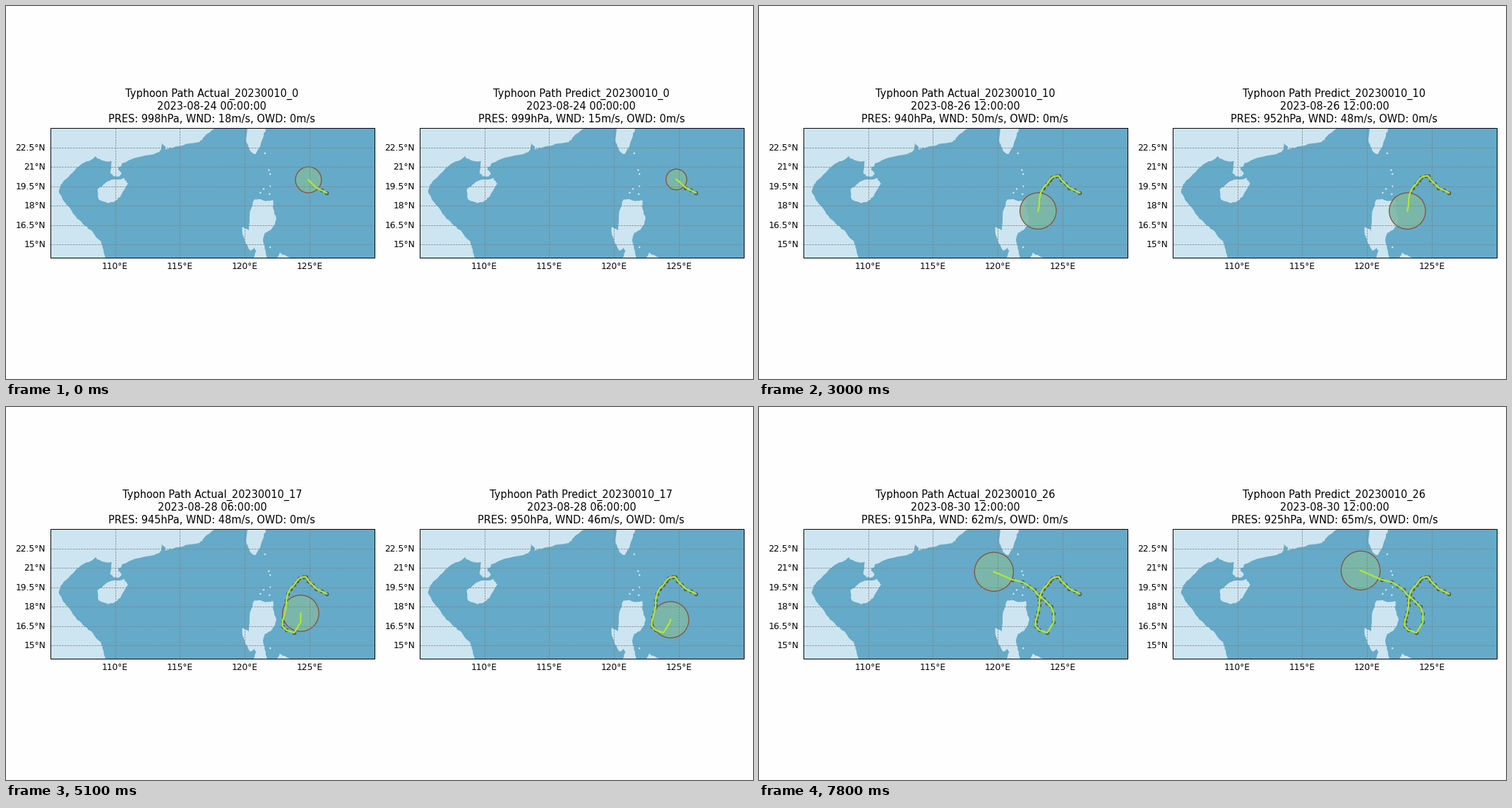
Animation of 1058 by 529 pixels, one loop 8 s. Source, as a matplotlib script:

```python
import numpy as np
import matplotlib.pyplot as plt
from matplotlib.animation import FuncAnimation
from matplotlib.patches import Circle, Polygon, Rectangle

W, H = 1058, 529
DEG = 18.38                      # pixels per degree
TOP, LEFTS = 173.05, (62.6, 585.6)
WEST, NORTH, WIDE, TALL = 105, 24, 25, 10
OCEAN, LAND = "#65aac8", "#cde5f0"
FRAME_MS, HOLD, FRAMES = 100, 3, 80

plt.rcParams["font.family"] = "DejaVu Sans"
fig = plt.figure(figsize=(12, 6), dpi=W / 12, facecolor="#fefefe")
ax = fig.add_axes([0, 0, 1, 1])
ax.set(xlim=(0, W), ylim=(H, 0))
ax.axis("off")

# Key points of the coasts in degrees; rough() adds the detail
MAINLAND = [
    (109.25, 14), (109.1, 14.6), (108.9, 15.25), (108.3, 16), (107.7, 16.5), (107.1, 17),
    (106.5, 17.8), (106, 18.4), (105.65, 19.1), (105.9, 19.8), (106.6, 20.4), (107, 20.9),
    (107.6, 21.3), (108.5, 21.75), (109.1, 21.45), (109.7, 21.45), (109.7, 20.5),
    (109.95, 20.25), (110.35, 20.3), (110.5, 20.55), (110.2, 20.9), (110.6, 21.25),
    (111.6, 21.75), (113, 22), (113.5, 22.2), (113.6, 22.85), (113.9, 22.4),
    (114.6, 22.55), (115.5, 22.75), (116.5, 22.95), (116.8, 23.3), (117.75, 24)]
HAINAN = [
    (109.7, 20), (110.7, 20.1), (111, 19.7), (110.5, 18.8), (110.1, 18.4), (109.5, 18.2),
    (108.7, 18.5), (108.65, 19.25), (109.2, 19.75), (109.7, 20)]
TAIWAN = [
    (120.2, 24), (120.1, 23), (120.3, 22.5), (120.7, 22), (120.88, 22), (121.4, 23.2),
    (121.6, 24)]
LUZON = [
    (121.7, 14), (121.6, 14.5), (121.4, 15.3), (121.6, 15.9), (122.1, 16.2), (122.45, 17),
    (122.15, 17.8), (122.2, 18.4), (121.6, 18.4), (120.7, 18.55), (120.4, 17.5),
    (120.3, 16.1), (119.8, 16.35), (119.95, 15.4), (120.4, 14.5), (120.7, 14.75),
    (120.95, 14.5), (120.65, 14)]
BICOL = [(122.5, 14), (122.7, 14.35), (123.5, 14)]
ISLETS = [(121.2, 19), (121.45, 19.3), (121.95, 19.5), (121.9, 18.9), (121.95, 20.45),
          (121.85, 20.75), (121.55, 22.05), (121.95, 14.8)]

# Storm centre: step, longitude, latitude
FIXES = np.array([
    (-4, 126.3, 19), (-1, 125.2, 19.7), (1, 124.7, 20.3), (5, 123.8, 19.7), (7, 123.3, 19),
    (10, 123.1, 17.6), (12, 122.9, 16.9), (14, 123.2, 16.2), (15, 123.8, 16),
    (16, 124.3, 16.8), (17, 124.3, 17.5), (21, 123.1, 18.9), (24, 121.9, 19.9),
    (25, 121.1, 20.1), (26, 119.7, 20.7)])
LEAD, N = 4, 27

# Readings at key steps, actual and predicted
KEYS = [0, 5, 10, 15, 17, 21, 26]
WIND = [18, 33, 50, 48, 48, 50, 62], [15, 30, 48, 61, 46, 46, 65]
PRES = [998, 975, 940, 945, 945, 940, 915], [999, 983, 952, 934, 950, 952, 925]
MISS = [-.1, -.15, 0, -.5, .05, -.1, -.2], [.03, -.2, 0, .2, -.5, .2, .1]
LEVELS, RADII = (17.2, 24.5, 32.7, 41.5, 51), (.8, 1, 1.15, 1.3, 1.4, 1.5)


def rough(pts, amp=.035, parts=4):
    """Subdivide a coast and shake it a little."""
    rng = np.random.default_rng(7)
    pts = np.array(pts, float)
    t = np.linspace(0, len(pts) - 1, parts * (len(pts) - 1) + 1)
    xy = np.column_stack([np.interp(t, range(len(pts)), c) for c in pts.T])
    xy[1:-1] += rng.normal(0, amp, (len(xy) - 2, 2))
    return xy


def hermite(t, p, at):
    """Smooth curve through p at times t."""
    m = np.gradient(p, t, axis=0)
    i = np.clip(np.searchsorted(t, at, side="right") - 1, 0, len(t) - 2)
    h = (t[i + 1] - t[i])[:, None]
    s = (at - t[i])[:, None] / h
    return ((1 + 2 * s) * (1 - s) ** 2 * p[i] + s * (1 - s) ** 2 * h * m[i]
            + s * s * (3 - 2 * s) * p[i + 1] + s * s * (s - 1) * h * m[i + 1])


def at_key(row, step):
    return np.interp(step, KEYS, row)


COASTS = [np.vstack([rough(MAINLAND), [(WEST, NORTH), (WEST, 14)]])]
COASTS += [rough(c) for c in (HAINAN, TAIWAN, LUZON, BICOL)]
TRACK = np.round(hermite(FIXES[:, 0], FIXES[:, 1:], np.arange(-LEAD, N)), 1)


class Panel:
    def __init__(self, k):
        self.k, self.x0 = k, LEFTS[k]
        x0, right, bottom = self.x0, self.x0 + WIDE * DEG, TOP + TALL * DEG
        box = dict(xy=(x0, TOP), width=WIDE * DEG, height=TALL * DEG)
        ax.add_patch(Rectangle(**box, fc=OCEAN, ec="none", zorder=0))
        clip = Rectangle(**box, transform=ax.transData)
        land = [Polygon(self.px(c)) for c in COASTS]
        land += [Circle(self.px(p), .07 * DEG) for p in ISLETS]
        for patch in land:
            patch.set(fc=LAND, ec="none", zorder=.5)
            ax.add_patch(patch)
            patch.set_clip_path(clip)

        grid = dict(color="gray", lw=.6, ls="--", zorder=2)
        for lon in range(110, 130, 5):
            x = self.px((lon, NORTH))[0]
            ax.plot([x, x], [TOP, bottom], **grid)
            ax.text(x - .4, 372.6, f"{lon}°E", ha="center", fontsize=10)
        for lat in np.arange(15, 23, 1.5):
            y = self.px((WEST, lat))[1]
            ax.plot([x0, right], [y, y], **grid)
            ax.text(x0 - 6.5, y + 3.9, f"{lat:g}°N", ha="right", fontsize=10)
        ax.add_patch(Rectangle(**box, fc="none", ec="black", lw=.8, zorder=5))

        self.dots, = ax.plot([], [], "o", ms=4.6, color="#565a58", mew=0, zorder=1)
        self.area = ax.add_patch(Circle((0, 0), 1, fc=(.49, .725, .65, .9),
                                        ec="#8c4a2c", lw=1, zorder=1.5))
        self.line, = ax.plot([], [], color="#ade53a", lw=2, zorder=3)
        self.title = [ax.text((x0 + right) / 2 - .5, y, "", ha="center", fontsize=11.9)
                      for y in (129, 147, 165.4)]

    def px(self, lonlat):
        return (np.array(lonlat) - [WEST, NORTH]) * [DEG, -DEG] + [self.x0, TOP]

    def show(self, step):
        k = self.k
        wind, pres = int(at_key(WIND[k], step)), int(at_key(PRES[k], step))
        miss = k * np.array([at_key(row, step) for row in MISS])
        past, now = TRACK[:LEAD + step], TRACK[LEAD + step] + miss
        path = self.px(np.vstack([past, now]))
        self.line.set_data(*path.T)
        self.dots.set_data(*path[:-1].T)
        self.area.center = path[-1]
        self.area.set_radius(RADII[np.searchsorted(LEVELS, wind, side="right")] * DEG)
        kind = ("Actual", "Predict")[k]
        day, hour = 24 + step // 4, step % 4 * 6
        lines = (f"Typhoon Path {kind}_20230010_{step}",
                 f"2023-08-{day} {hour:02d}:00:00",
                 f"PRES: {pres}hPa, WND: {wind}m/s, OWD: {int(wind == 61)}m/s")
        for text, s in zip(self.title, lines):
            text.set_text(s)


panels = [Panel(0), Panel(1)]


def update(frame):
    for p in panels:
        p.show(min(frame // HOLD, N - 1))
    return []


anim = FuncAnimation(fig, update, frames=FRAMES, interval=FRAME_MS,
                     init_func=lambda: update(0), repeat=True, repeat_delay=0, blit=False)
plt.show()
```
